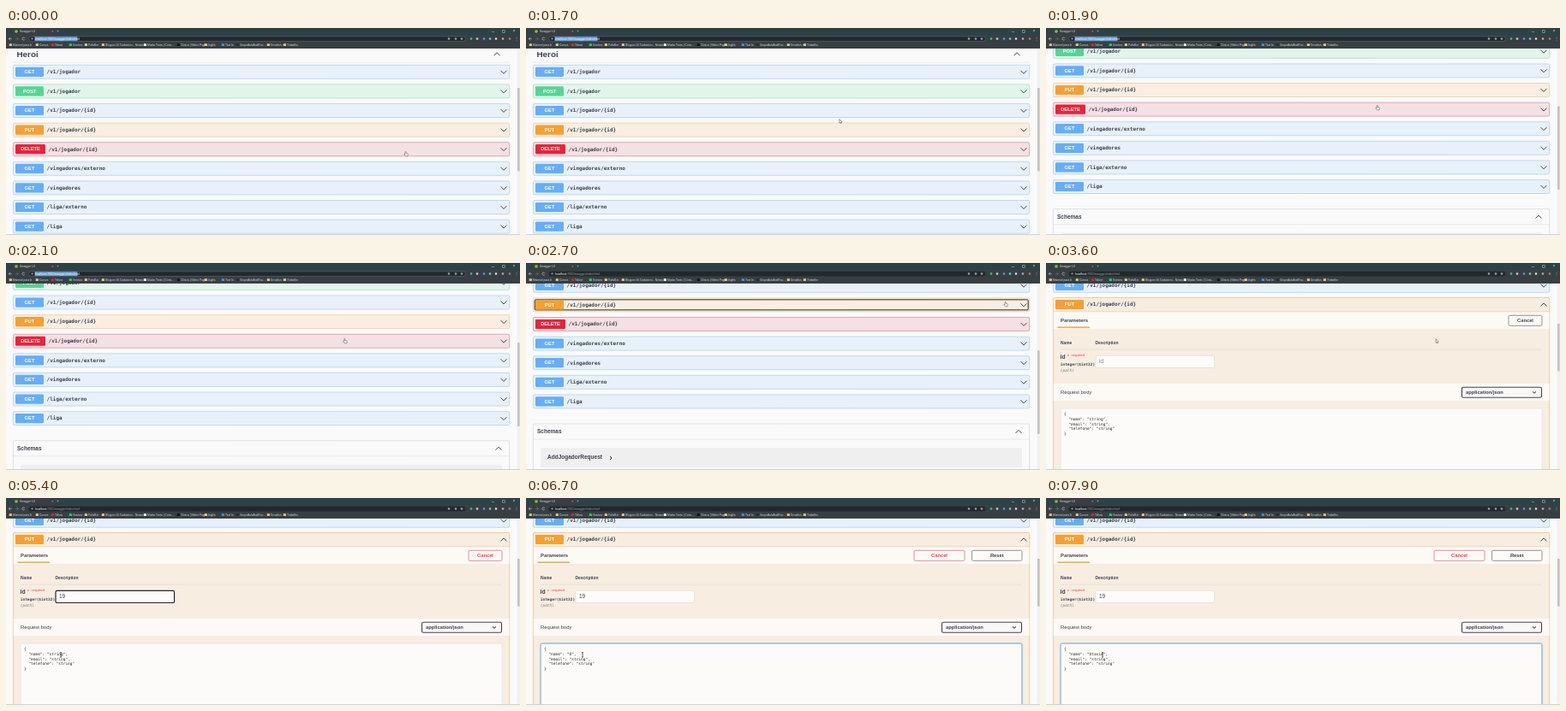
Recreate the animation shown at these times as an HTML page with a canvas. Size 600 by 242 pixels, loop 8 s.

```html
<!DOCTYPE html>
<html lang="pt">
<head>
<meta charset="utf-8">
<title>Swagger UI</title>
<style>
html, body { margin: 0; width: 100%; height: 100%; overflow: hidden; background: #fafafa; }
canvas { display: block; width: 600px; height: 242px; }
</style>
</head>
<body>
<canvas id="stage"></canvas>
<script>
const LOOP = 8000, EXPAND = 2750, TRY = 3300, FOCUS_ID = 4300, FOCUS_BODY = 5550, SELECT = 5900, TYPE = 6600;
const SANS = '"Liberation Sans", Arial, sans-serif', MONO = '"DejaVu Sans Mono", monospace';
const INK = '#3b4151', PITCH = 22.6;
const canvas = document.getElementById('stage'), c = canvas.getContext('2d');
const ratio = window.devicePixelRatio || 1;
canvas.width = 600 * ratio;
canvas.height = 242 * ratio;

const METHODS = { // badge, background, border
  GET: ['#65aefa', '#e8f1f9', '#a9cdee'],
  POST: ['#55d494', '#e3f5eb', '#a0dfbf'],
  PUT: ['#f79f32', '#f9eee1', '#f0c797'],
  DELETE: ['#ee2038', '#f5e0e3', '#d08d98']
};
const ROUTES = [
  ['GET', '/v1/jogador'], ['POST', '/v1/jogador'], ['GET', '/v1/jogador/{id}'],
  ['PUT', '/v1/jogador/{id}'], ['DELETE', '/v1/jogador/{id}'], ['GET', '/vingadores/externo'],
  ['GET', '/vingadores'], ['GET', '/liga/externo'], ['GET', '/liga']
];
const FOLDER = '#e6cd7c';
const BOOKMARKS = [
  [8, 'Material para le', FOLDER], [39, 'Cursos', FOLDER], [57, 'Telivor', '#f02020'], [78, 'Sonivra', '#1ed760'],
  [96, 'PalniBot', FOLDER], [116, 'Blogues', FOLDER], [133, 'Cadastros - Netwo...', '#66788a'],
  [165, 'Mudar Texto | Conv...', '#f4f4f4'], [204, 'Clinica | Editor Pagin...', '#111417'], [236, 'Inglês', FOLDER],
  [256, 'Text In', '#4a90e2'], [273, 'GrupoAulaAndRoo...', '#2a2d31'], [309, 'Desafios', FOLDER], [328, 'Trabalho', FOLDER]
];
const MOUSE = [ // time, x, y
  [0, 467, 147], [800, 440, 138], [1600, 367, 109], [1700, 367, 109], [1900, 387, 93], [2200, 400, 90],
  [2650, 560, 48], [2800, 560, 48], [3150, 560, 67], [3300, 560, 67], [3600, 457, 91], [4200, 120, 115],
  [4900, 120, 115], [5350, 64, 183], [6200, 64, 183], [6500, 66, 183], [LOOP, 66, 183]
];

const clamp = v => Math.max(0, Math.min(1, v));
const ease = (t, from, to) => { const p = clamp((t - from) / (to - from)); return p * p * (3 - 2 * p); };

function rect(x, y, w, h, fill) {
  c.fillStyle = fill;
  c.fillRect(x, y, w, h);
}
function box(x, y, w, h, r, fill, stroke, width = 0.7) {
  c.beginPath();
  c.roundRect(x, y, w, h, r);
  if (fill) { c.fillStyle = fill; c.fill(); }
  if (stroke) { c.strokeStyle = stroke; c.lineWidth = width; c.stroke(); }
}
function dot(x, y, r, fill) {
  c.beginPath();
  c.arc(x, y, r, 0, 7);
  c.fillStyle = fill;
  c.fill();
}
function line(points, color, width) {
  c.beginPath();
  points.forEach(([x, y]) => c.lineTo(x, y));
  c.strokeStyle = color;
  c.lineWidth = width;
  c.stroke();
}
function text(str, x, y, size, color = INK, style = '', family = SANS, align = 'left') {
  c.font = `${style} ${size}px ${family}`;
  c.textAlign = align;
  c.fillStyle = color;
  c.fillText(str, x, y);
}
const bold = (str, x, y, size, color, align) => text(str, x, y, size, color, 'bold', SANS, align);
const mono = (str, x, y, size, color, style = '') => text(str, x, y, size, color, style, MONO);

function chevron(x, y, up, size = 3.5) {
  const d = up ? -size / 4 : size / 4;
  line([[x - size, y - 2 * d], [x, y + 2 * d], [x + size, y - 2 * d]], '#333', 0.9);
}

function summary(method, path, y, open) {
  const w = method === 'DELETE' ? 35 : 33;
  box(11, y - 5.6, w, 11.2, 1.3, METHODS[method][0]);
  bold(method, 11 + w / 2, y + 0.2, 5.75, '#fff', 'center');
  mono(path, w + 14.6, y + 0.3, 5.97, INK, 'bold');
  chevron(581, y + 0.2, open);
}

function route([method, path], y, focused) {
  const [, fill, border] = METHODS[method];
  box(8.4, y - 8, 579.3, 16, 1.6, fill, border, 0.7);
  if (focused) box(10.2, y - 6, 576, 12, 1, null, '#2b2620', 1);
  summary(method, path, y, false);
}

function schemas(y) {
  box(8.4, y - 9, 579.3, 120, 1.6, '#fafafa', '#cfd1d4', 0.6);
  bold('Schemas', 13, y + 0.2, 6.5);
  chevron(575, y + 0.2, true);
  line([[8.4, y + 9], [587.7, y + 9]], '#d8d9dc', 0.5);
  box(17, y + 19, 562, 23, 1.6, '#efefef');
  bold('AddJogadorRequest', 25, y + 30.7, 6.5);
  line([[98, y + 28.9], [100, y + 31], [98, y + 33.1]], '#222', 1);
}

function button(label, x, w, color, border) {
  box(x, 61.3, w, 12, 1.6, null, border, 0.9);
  bold(label, x + w / 2, 67.5, 5.75, color, 'center');
}

function json(name, x, y, color) {
  ['{', `  "nome": "${name}",`, '  "email": "string",', '  "telefone": "string"', '}']
    .forEach((row, i) => mono(row, x, y + i * 5.75, 4.49, color));
}

function requestBody(t, typed) {
  if (t < TRY) {
    text('Example Value', 17, 174, 4.9);
    text('|  Schema', 51, 174, 4.9, '#7a7f89');
    box(17, 181, 562, 38, 1.6, '#333');
    json('string', 21, 188, '#fff');
    rect(8.8, 229, 578.6, 20, '#fdfaf6');
    bold('Responses', 17, 238, 5.9);
    return;
  }
  const active = t >= FOCUS_BODY;
  box(17, 170, 562, 90, 1.6, '#fcfbf9', active ? '#5f9fd8' : '#e3ded8', active ? 1 : 0.6);
  if (t >= SELECT && !typed) rect(50.7, 179.5, 16.2, 5.7, '#a9cdf7');
  json(typed || 'string', 21, 176.9, '#222');
}

function putPanel(t) {
  const typed = 'Otavio'.slice(0, t < TYPE ? 0 : 1 + Math.floor((t - TYPE) / 140));
  box(8.4, 40.5, 579.3, 240, 1.6, '#f7ede1', '#f0bd83', 0.7);
  summary('PUT', ROUTES[3][1], 48.5, true);
  rect(8.8, 57, 578.6, 20, '#fdfaf6');
  line([[8.4, 56.8], [587.7, 56.8]], '#f0c797', 0.6);
  bold('Parameters', 17, 67.4, 5.9);
  rect(13.5, 74.5, 37.5, 1.6, '#f0a850');

  const red = t > 3650;
  if (typed) {
    button('Cancel', 453, 59, '#ec3b46', '#f07a80');
    button('Reset', 520.5, 58.5, INK, '#888');
  } else if (t >= TRY) {
    button('Cancel', 540, 39, red ? '#ec3b46' : INK, red ? '#f07a80' : '#888');
  } else {
    button('Try it out', 540, 39, INK, '#888');
  }

  bold('Name', 17, 93.8, 4.9);
  bold('Description', 57.5, 93.8, 4.9);
  line([[17, 101.2], [579, 101.2]], '#d9d2ca', 0.5);
  text('id', 16.5, 109.7, 6.8, INK, 'bold');
  text('*', 24.8, 109.7, 6, '#f33');
  text('required', 29.5, 107.9, 4.2, '#f33');
  mono('integer($int32)', 16.8, 118.6, 4.49, INK, 'bold');
  mono('(path)', 16.8, 126.2, 4.49, '#777', 'italic');

  const focused = t >= FOCUS_ID && t < FOCUS_BODY;
  const id = t < 4700 ? '' : t < 4900 ? '1' : '19';
  box(58, 108.3, 138.5, 14.2, 1.6, t < TRY ? '#f7f3ee' : '#fdfcfa', focused ? '#22262c' : '#ddd7d0', focused ? 1.2 : 0.6);
  text(id || 'id', 62, 115.7, 6.5, id ? INK : '#858585');

  rect(8.8, 141, 578.6, 20, '#fdfaf6');
  text('Request body', 17, 151.5, 5.9);
  box(485.5, 145.3, 93, 12, 1.6, '#f9f8f6', '#41444e', 1.1);
  bold('application/json', 490, 151.4, 5.75);
  line([[568, 150.4], [570, 152.3], [572, 150.4]], '#222', 1);
  requestBody(t, typed);
}

function browser(selected) {
  rect(0, 0, 600, 8, '#2c4247');
  box(6.5, 1, 53, 9, 2, '#383f43');
  rect(0, 8, 600, 16, '#383f43');
  dot(12, 4, 1.8, '#6fce3a');
  text('Swagger UI', 16, 4.1, 3.4, '#d4d8da');
  text('×', 54.5, 4, 4, '#ccc', '', SANS, 'center');
  text('+', 60.5, 4, 4.5, '#ccc', '', SANS, 'center');
  rect(567, 4, 3, 0.5, '#ccc');
  box(579.5, 2.6, 2.8, 2.8, 0, null, '#ccc', 0.5);
  text('×', 593, 4, 5, '#ddd', '', SANS, 'center');

  line([[5.2, 10.8], [3.2, 12.6], [5.2, 14.4]], '#ccc', 0.6);
  line([[3.2, 12.6], [6.7, 12.6]], '#ccc', 0.6);
  line([[12.5, 10.8], [14.5, 12.6], [12.5, 14.4]], '#777', 0.6);
  line([[11, 12.6], [14.5, 12.6]], '#777', 0.6);
  c.beginPath();
  c.arc(20.5, 12.6, 1.6, 0.5, 5.8);
  c.strokeStyle = '#ccc';
  c.stroke();
  box(26.5, 9.8, 510, 5.8, 2.9, '#22292c', selected ? '#587a96' : null, 0.5);
  dot(30.5, 12.6, 1, '#a9adb1');
  if (selected) rect(33.5, 10.2, 50, 4.9, '#6aa3d8');
  text('localhost', 34, 12.7, 3.4, '#fff');
  const hostWidth = c.measureText('localhost').width;
  text(':7001/swagger/index.html', 34 + hostWidth, 12.7, 3.4, selected ? '#fff' : '#9a9fa4');
  [[517, '#999'], [525, '#999'], [532, '#999'], [543, '#4cbf6b'], [550, '#c9cdd0'], [558, '#4f9be8'],
    [565, '#69c6d8'], [572, '#d8d8d8'], [580, '#aaa'], [588, '#a67c68']].forEach(([x, color]) => dot(x, 12.6, 1.3, color));
  [11, 12.6, 14.2].forEach(y => dot(596, y, 0.4, '#ccc'));

  for (const [x, label, color] of BOOKMARKS) {
    box(x - 4.3, 18.3, 3.2, 2.8, 0.5, color);
    text(label, x, 19.9, 3.25, '#d6dadc');
  }
}

function pointer(t, scroll) {
  const i = MOUSE.findIndex((key, n) => n && t <= key[0]);
  const [t0, x0, y0] = MOUSE[i - 1], [t1, x1, y1] = MOUSE[i];
  const p = (t - t0) / (t1 - t0), x = x0 + (x1 - x0) * p, y = y0 + (y1 - y0) * p;
  const editing = t > TRY && (y > 170 || (x < 197 && y > 108 && y < 123));
  const offset = (y + scroll - 51) / PITCH;
  const hand = t < EXPAND ? Math.abs(offset - Math.round(offset)) < 0.36 : y < 74 && t < 3400;
  c.save();
  c.translate(x, y + 0.3);
  c.lineWidth = 0.5;
  c.strokeStyle = '#444';
  c.fillStyle = '#fff';
  if (editing) {
    line([[-1.1, -2.7], [1.1, -2.7]], '#222', 0.6);
    line([[0, -2.7], [0, 2.7]], '#222', 0.7);
    line([[-1.1, 2.7], [1.1, 2.7]], '#222', 0.6);
  } else {
    const shape = hand
      ? 'M-1-2.6 0-2.6 0-.8 2-.4 2.4.3 2 2.5-.7 2.5-2.3.5-1.9 0-1 .6Z'
      : 'M-1.3-2.6-1.3 1.8-.3 1 .4 2.6 1.1 2.3.5.8 1.8.7Z';
    const path = new Path2D(shape);
    c.fill(path);
    c.stroke(path);
  }
  c.restore();
}

function draw(t) {
  const scroll = 46.6 * ease(t, 1720, 1890) + 23.6 * ease(t, 2060, 2220);
  const open = t >= EXPAND;
  c.setTransform(ratio, 0, 0, ratio, 0, 0);
  c.textBaseline = 'middle';
  rect(0, 0, 600, 242, '#fafafa');

  bold('Heroi', 12.5, 31 - scroll, 9.85);
  chevron(573, 30.5 - scroll, true);
  line([[8, 40.2 - scroll], [588, 40.2 - scroll]], '#dcdde0', 0.5);
  ROUTES.slice(0, open ? 3 : 9).forEach((item, i) =>
    route(item, 51.3 + PITCH * i - scroll, i === 3 && t >= 2650));
  if (open) putPanel(t);
  else schemas(267.2 - scroll);

  rect(596.5, 24, 3.5, 218, '#f1f1f1');
  rect(597, open ? 71 : 70 + scroll * 0.46, 2.6, open ? 55.5 : 97.5, '#c1c1c1');
  rect(0, 241, 600, 1, '#c3d5d9');
  browser(t < 2650);
  pointer(t, scroll);
}

function frame(now) {
  draw(now % LOOP);
  requestAnimationFrame(frame);
}
requestAnimationFrame(frame);
</script>
</body>
</html>
```
